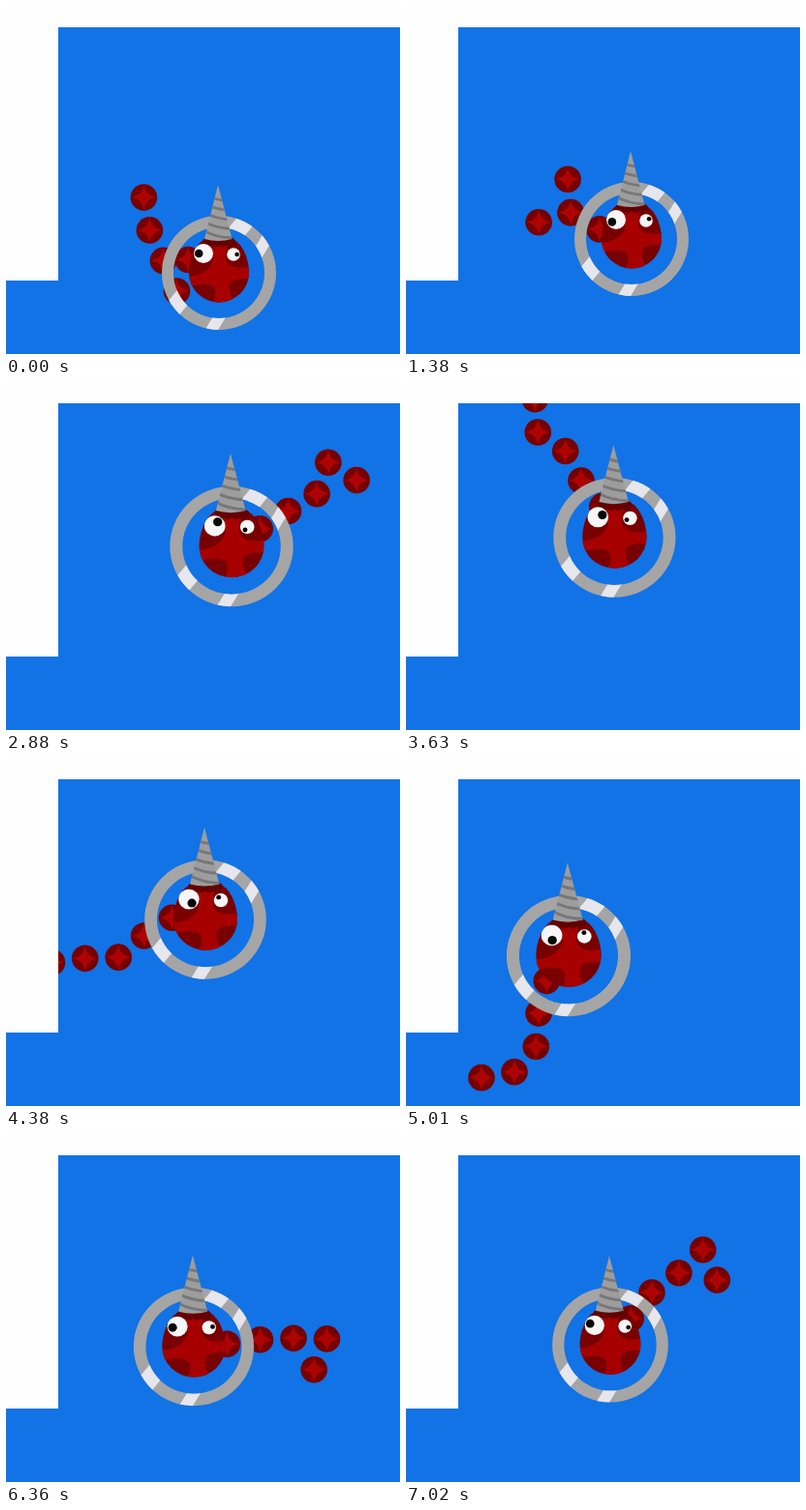
These frames come from a looping animation (407x360 px, 7170 ms). An HTML page with a canvas:

```html
<!DOCTYPE html>
<html lang="en">
<head>
<meta charset="utf-8">
<title>Horned swimmer</title>
<style>
html, body { margin: 0; width: 100%; height: 100%; overflow: hidden; background: #fefefe; }
canvas { display: block; width: 407px; height: 360px; }
</style>
</head>
<body>
<canvas id="stage"></canvas>
<script>
const W = 407, H = 360, LOOP = 7170, STEP = 30, START = 780, END = 7020;
const LINK = 34.5;

// time, x, y of the ring centre
const PATH = [
  [START, 220, 276], [1000, 216, 275], [1200, 217, 261], [1380, 233, 241],
  [1500, 265, 239], [1700, 304, 208], [1950, 300, 161], [2220, 291, 146],
  [2550, 255, 158], [2880, 233, 170], [3300, 206, 167], [3700, 217, 160],
  [4380, 206, 167], [4750, 182, 189], [5130, 165, 210], [5670, 190.5, 212],
  [6200, 191, 217], [6570, 199, 223], [END, 211, 218]
];

// time, size, pupil angle, then the direction of each tail link
const POSE = [
  [START, 1, 180, 203, 110, 246, 246, 260],
  [1380, 1, 150, 197, 210, 163, 343, 265],
  [1950, 1.08, 108, 101, 90, -22, 158, 188],
  [2880, 1.08, -55, -32, -32, -31, -70, 32],
  [4380, 1.065, 53, -177, -213, -220, -182, -187],
  [5670, 1.1, 115, -283, -296, -304, -282, -183],
  [END, 1.015, 200, -412, -411, -396, -404, -295]
];

const canvas = document.getElementById("stage");
const ctx = canvas.getContext("2d");
const dpr = window.devicePixelRatio || 1;
canvas.width = W * dpr;
canvas.height = H * dpr;

const rad = deg => deg * Math.PI / 180;

// Smooth curve through the rows of a table, at rest at both ends
function sample(rows, t) {
  const last = rows.length - 1;
  if (t <= rows[0][0]) return rows[0].slice(1);
  if (t >= rows[last][0]) return rows[last].slice(1);
  let i = 0;
  while (rows[i + 1][0] <= t) i++;
  const a = rows[i], b = rows[i + 1], d = b[0] - a[0], u = (t - a[0]) / d;
  const slope = (k, c) => {
    if (k === 0 || k === last) return 0;
    const p = rows[k - 1], q = rows[k], n = rows[k + 1];
    const before = (q[c] - p[c]) / (q[0] - p[0]), after = (n[c] - q[c]) / (n[0] - q[0]);
    const h0 = q[0] - p[0], h1 = n[0] - q[0];
    return (before * h1 + after * h0) / (h0 + h1);
  };
  const u2 = u * u, u3 = u2 * u;
  return a.slice(1).map((v, j) => {
    const c = j + 1;
    return (2 * u3 - 3 * u2 + 1) * v + (u3 - 2 * u2 + u) * d * slope(i, c)
      + (3 * u2 - 2 * u3) * b[c] + (u3 - u2) * d * slope(i + 1, c);
  });
}

function disc(x, y, r, color) {
  ctx.fillStyle = color;
  ctx.beginPath();
  ctx.arc(x, y, r, 0, 2 * Math.PI);
  ctx.fill();
}

function star(r, waist, color) {
  ctx.fillStyle = color;
  ctx.beginPath();
  ctx.moveTo(r, 0);
  for (let k = 1; k <= 4; k++) {
    const mid = rad(k * 90 - 45), tip = rad(k * 90);
    ctx.quadraticCurveTo(waist * Math.cos(mid), waist * Math.sin(mid),
      r * Math.cos(tip), r * Math.sin(tip));
  }
  ctx.fill();
}

function ball(x, y) {
  ctx.save();
  ctx.translate(x, y);
  disc(0, 0, 13.8, "#760000");
  star(13.4, 2, "#ad0303");
  ctx.restore();
}

const bodyShape = new Path2D("M-16-34C-26-28-31-12-31 0A31 30.5 0 0 0 31 0C31-12 26-28 16-34Z");
const bodyMark = new Path2D("M-31 4Q-9 1-6-14Q-5-24-10-34H12Q5-22 8-12Q13-3 31-6V6Q12 5 11 13Q10 22 17 32H-7Q-1 22-5 15Q-11 9-31 14Z");
const hornShape = new Path2D("M-1-91L13.5-35Q-1-31-15-35Z");
const ringShape = new Path2D();
ringShape.arc(0, 0, 59, 0, 2 * Math.PI);
ringShape.arc(0, 0, 47, 0, 2 * Math.PI, true);

function line(x1, y1, x2, y2, width, color) {
  ctx.strokeStyle = color;
  ctx.lineWidth = width;
  ctx.beginPath();
  ctx.moveTo(x1, y1);
  ctx.lineTo(x2, y2);
  ctx.stroke();
}

function body() {
  ctx.save();
  ctx.clip(bodyShape);
  ctx.fillStyle = "#780000";
  ctx.fillRect(-40, -40, 80, 80);
  ctx.fillStyle = "#a70000";
  ctx.fill(bodyMark);
  ctx.restore();
  for (const x of [-12, -4, 4, 12]) disc(x, -31.5, 5, "#650000");
}

function ring() {
  ctx.save();
  ctx.clip(ringShape);
  ctx.fillStyle = "#a5a5a5";
  ctx.fillRect(-60, -60, 120, 120);
  line(35, -62.8, -57.5, 49.6, 18, "#e6e6ec");
  line(67, -64.4, -14, 69.5, 11.5, "#e6e6ec");
  ctx.restore();
}

function horn() {
  ctx.save();
  ctx.clip(hornShape);
  ctx.fillStyle = "#9d9d9d";
  ctx.fillRect(-20, -95, 40, 65);
  ctx.strokeStyle = "#777";
  ctx.lineWidth = 2.8;
  for (let k = 0; k < 5; k++) {
    const y = -77 + k * 9.5;
    ctx.beginPath();
    ctx.moveTo(-16, y - 5);
    ctx.quadraticCurveTo(-3, y + 3, 16, y + 3);
    ctx.stroke();
  }
  ctx.restore();
}

function eye(x, y, r, pupil, reach, angle) {
  disc(x, y, r, "#f6f6f6");
  disc(x + reach * Math.cos(rad(angle)), y + reach * Math.sin(rad(angle)), pupil, "#080808");
}

function draw(t) {
  const [x, y] = sample(PATH, t);
  const [size, look, ...links] = sample(POSE, t);
  ctx.setTransform(dpr, 0, 0, dpr, 0, 0);
  ctx.fillStyle = "#fefefe";
  ctx.fillRect(0, 0, W, H);

  ctx.save();
  ctx.beginPath();
  ctx.rect(54, 22, W - 54, 262);
  ctx.rect(0, 284, W, H - 284);
  ctx.clip();
  ctx.fillStyle = "#1173e6";
  ctx.fillRect(0, 0, W, H);

  let bx = x, by = y;
  const tail = links.map(a => [bx += LINK * Math.cos(rad(a)), by += LINK * Math.sin(rad(a))]);
  tail.reverse().forEach(p => ball(...p));

  ctx.translate(x, y);
  ctx.scale(size, 1 + (size - 1) * 0.7);
  body();
  ring();
  horn();
  eye(-16, -20, 10, 4.3, 4.8, look);
  eye(15, -19, 6.8, 2.3, 3.6, look + 180);
  ctx.restore();
}

const t0 = performance.now();
function tick() {
  const t = (performance.now() - t0) % LOOP;
  draw(Math.floor(t / STEP) * STEP);
  requestAnimationFrame(tick);
}
tick();
</script>
</body>
</html>
```
